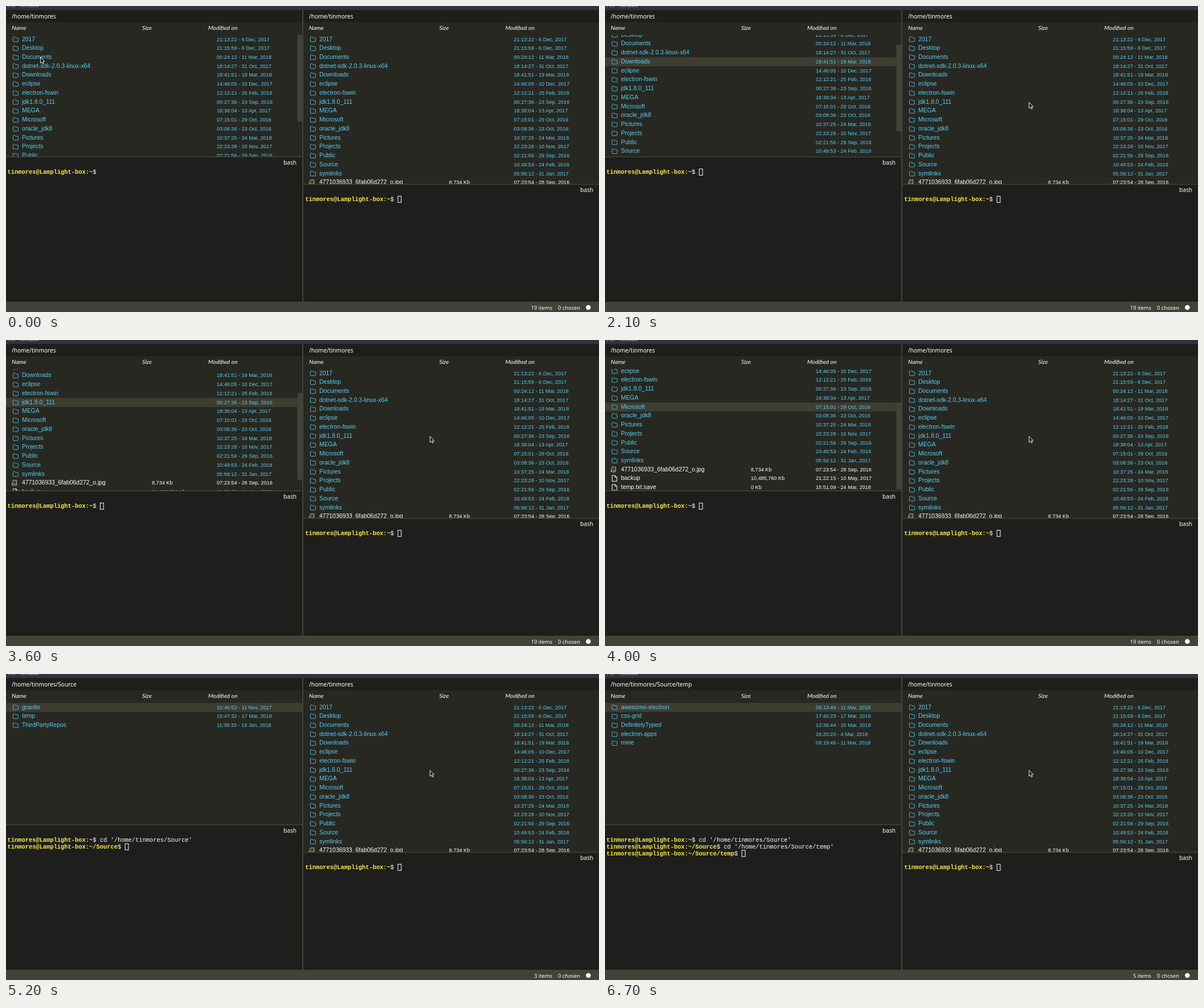
An HTML page for the animation above (8000 ms loop, 1041 by 538 pixels).

```html
<!DOCTYPE html>
<html lang="en">
<head>
<meta charset="utf-8">
<title>Two-pane file manager</title>
<style>
  html, body { margin: 0; width: 100%; height: 100%; overflow: hidden; background: #1e1f1c; }
  svg { display: block; width: 100%; height: 100%; }
  text { font: 10.1px "Noto Sans", "Open Sans", sans-serif; fill: #fff; white-space: pre; }
  .name { font: 10.4px "Liberation Sans", Arial, sans-serif; }
  .info { font: 9.12px "Liberation Sans", Arial, sans-serif; }
  .dir { fill: #5accf2; }
  .head { font: italic 10.4px Lato, "Open Sans", sans-serif; }
  .term { font: 10.4px "Liberation Mono", "Courier New", monospace; }
  .prompt { font-weight: bold; fill: #fce94f; }
  .menu { font-size: 8.7px; fill: #a9b0bd; }
  .status { font-size: 9.3px; }
  .end { text-anchor: end; }
  .line { fill: none; stroke: #fff; }
  .line.dir { fill: none; stroke: #5accf2; stroke-width: .85; }
  .line.pic { stroke: #c9c98b; }
</style>
</head>
<body>
<svg viewBox="0 0 1041 538" preserveAspectRatio="none">
  <defs>
    <clipPath id="clipL"><path d="M0 51H520V264.6H0Z"/></clipPath>
    <clipPath id="clipR"><path d="M522 51H1041V312.8H522Z"/></clipPath>
    <path id="dir" class="line dir" d="M12.4 4.5q0-1 1-1h2.3l1.3 1.4h3.4q1 0 1 1v4.9q0 1-1 1h-7q-1 0-1-1z"/>
    <path id="file" class="line" d="M12.6 2.3h5.2l3.1 3.1v7.2h-8.3zM17.6 2.5v3.1h3.1"/>
    <path id="pic" class="line pic" d="M12.7 3h6v8.6h-8.2v-2.4zM10.8 10.8l2.7-3 2 2 2.6-1.6M14.6 5.5h1.6"/>
  </defs>
  <path fill="#272822" d="M0 28.5H1041V313H521V265H0Z"/>
  <path fill="#2f343f" d="M0 0H1041V7H0Z"/>
  <path fill="#414339" d="M520 7h2V520h-2zM0 264.6H520v1.4H0zM522 312.8H1041v1.4H522zM0 520H1041V538H0Z"/>
  <circle cx="1022.3" cy="530" r="4.3" fill="#fff"/>
  <g id="fixed"></g>
  <g id="live"></g>
  <path id="mouse" d="M0 0V10.6L2.4 8.5 4.2 12 5.9 11.2 4.2 7.7H7.2Z" fill="#16171a" stroke="#fff" stroke-width=".9"/>
</svg>
<script>
const ROW = 15.74, TOP = 50.9, LIST_H = 213.7, CHAR = 6.24, LINE = 11.7, LOOP = 8000;
const USER = 'tinmores', HOME = '/home/' + USER, HOST = USER + '@Lamplight-box:';
const $ = id => document.getElementById(id);

// Each entry: name | modified | size (files only)
const parse = s => s.trim().split('\n').map(l => l.split('|'));
const home = parse(`
2017|21:13:22 - 6 Dec, 2017
Desktop|21:15:59 - 6 Dec, 2017
Documents|00:24:12 - 11 Mar, 2018
dotnet-sdk-2.0.3-linux-x64|18:14:27 - 31 Oct, 2017
Downloads|18:41:51 - 19 Mar, 2018
eclipse|14:46:05 - 10 Dec, 2017
electron-fswin|12:12:21 - 25 Feb, 2018
jdk1.8.0_111|00:27:36 - 23 Sep, 2016
MEGA|18:38:04 - 13 Apr, 2017
Microsoft|07:15:01 - 29 Oct, 2016
oracle_jdk8|03:08:36 - 23 Oct, 2016
Pictures|10:37:25 - 24 Mar, 2018
Projects|22:23:28 - 10 Nov, 2017
Public|02:21:56 - 29 Sep, 2016
Source|10:49:53 - 24 Feb, 2018
symlinks|05:56:12 - 31 Jan, 2017
4771036933_6fab06d272_o.jpg|07:23:54 - 28 Sep, 2016|8,734 Kb
backup|21:22:15 - 10 May, 2017|10,485,760 Kb
temp.txt.save|15:51:09 - 24 Mar, 2018|0 Kb`);
const source = parse(`
granite|10:46:52 - 11 Nov, 2017
temp|15:47:32 - 17 Mar, 2018
ThirdPartyRepos|11:39:33 - 13 Jan, 2018`);
const temp = parse(`
awesome-electron|09:13:49 - 11 Mar, 2018
css-grid|17:40:23 - 17 Mar, 2018
DefinitelyTyped|12:38:44 - 10 Mar, 2018
electron-apps|16:20:20 - 4 Mar, 2018
mine|09:19:46 - 11 Mar, 2018`);

const text = (x, y, s, cls = '') => `<text x="${x}" y="${y}" class="${cls}">${s}</text>`;
const rect = (x, y, w, h, attr) => `<rect x="${x}" y="${y}" width="${w}" height="${h}" ${attr}/>`;

function rows(items, dx, scroll, clip) {
  const body = items.map(([name, date, size], i) => {
    const y = TOP + i * ROW - scroll, base = y + 10.62;
    const kind = !size ? 'dir' : name.endsWith('.jpg') ? 'pic' : 'file';
    const tone = size ? '' : ' dir';
    return `<use href="#${kind}" x="${dx}" y="${y}"/>` +
      text(28 + dx, base, name, 'name' + tone) +
      text(370 + dx - (dx && .5), base, date, 'info' + tone) +
      (size ? text(256 + dx - (dx && .2), base, size, 'info') : '');
  }).join('');
  return `<g clip-path="url(#${clip})">${body}</g>`;
}

// Lines are [directory, command]; the caret follows the last one.
function terminal(x, top, lines, caret) {
  let out = '', cols = 0;
  lines.forEach(([dir, cmd = ''], i) => {
    const prompt = HOST + dir, y = top + i * LINE + 8.8;
    out += text(x, y, `<tspan class="prompt">${prompt}</tspan>$ ${cmd}`, 'term');
    cols = prompt.length + 2;
  });
  const y = top + (lines.length - 1) * LINE + .3;
  return out + (caret ? rect(x + cols * CHAR + .6, y, 5.8, 11, 'class="line"') : '');
}

const heads = dx => text(10 + dx, 42, 'Name', 'head') +
  text(239 + dx - (dx && .5), 42, 'Size', 'head') +
  text(355 + dx - (dx && .5), 42, 'Modified on', 'head');

$('fixed').innerHTML = text(3, 2.2, 'File', 'menu') + text(25, 2.2, 'Window', 'menu') +
  heads(0) + heads(522) + text(532, 22, HOME) + rows(home, 522, 0, 'clipR') +
  text(510, 278.7, 'bash', 'end') + text(1031, 326.8, 'bash', 'end') +
  terminal(525.2, 334.1, [['~']], true) + text(969, 533.5, '0 chosen', 'status');

const keyTimes = [1700, 2100, 2500, 2800, 3600, 3800, 4000, 4200, 4400, 4600, 4800, 4900];
const cd = path => `cd '${HOME}${path}'`;

function left(t) {
  let items = home, path = '', scroll = 0, bar = '';
  let sel = t < 500 ? -1 : 2 + keyTimes.filter(k => k <= t).length;
  const lines = [['~']];
  if (t >= 5200) {
    items = source; path = '/Source'; sel = t < 6200 ? 0 : 1;
    lines[0].push(cd(path));
    lines.push(['~/Source']);
  }
  if (t >= 6600) {
    items = temp; path = '/Source/temp'; sel = 0;
    lines[1].push(cd(path));
    lines.push(['~/Source/temp']);
  }
  let width = 520;
  const full = items.length * ROW;
  if (full > LIST_H) {
    width = 511.5;
    scroll = Math.min(Math.max(0, sel - 2) * ROW * .75, full - LIST_H);
    const k = LIST_H / full;
    bar = rect(width, TOP + scroll * k, 8.5, LIST_H * k, 'fill="#414339"');
  }
  const mark = sel < 0 ? '' : rect(0, TOP + sel * ROW - scroll, width, ROW, 'fill="#3e3d32"');
  const caret = t >= 200 && !(t >= 800 && t < 1000);
  return mark + bar + text(10, 22, HOME + path) + rows(items, 0, scroll, 'clipL') +
    terminal(2.6, 286.3, lines, caret) + text(959, 533.5, items.length + ' items', 'status end');
}

let shown = -1;
function frame(now) {
  const step = Math.floor(now % LOOP / 100);
  if (step !== shown) {
    shown = step;
    $('live').innerHTML = left(step * 100);
    const p = Math.min(1, Math.max(0, (step - 4) / 6)), e = p * p * (3 - 2 * p);
    $('mouse').setAttribute('transform', `translate(${60.6 + 683.8 * e} ${90 + 79.2 * e})`);
  }
  requestAnimationFrame(frame);
}
frame(0);
</script>
</body>
</html>
```
